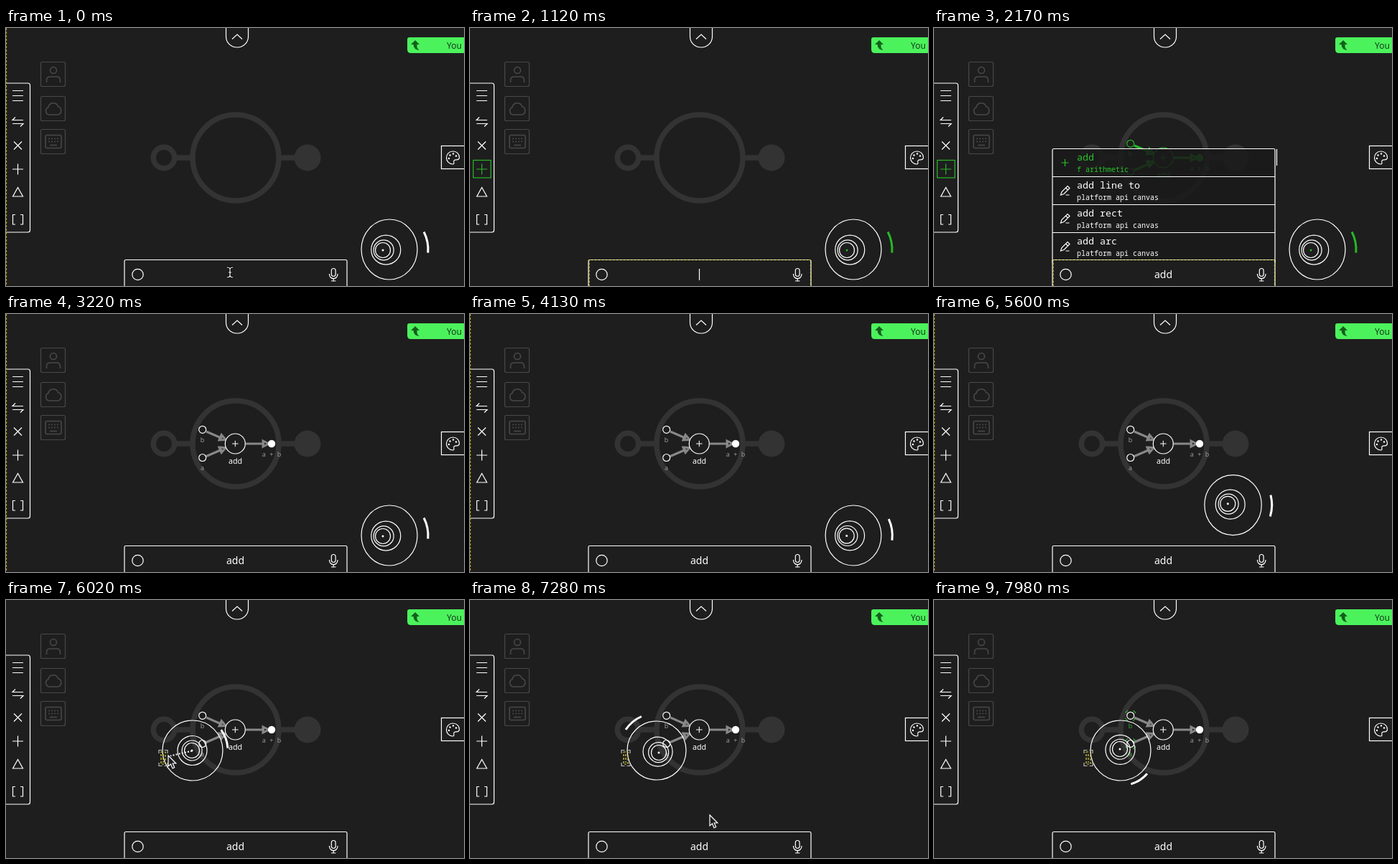
An HTML page that plays this animation: 638x360 px, repeating every 8000 ms.

```html
<!DOCTYPE html>
<html lang="en">
<meta charset="utf-8">
<title>Node editor</title>
<style>
  html, body { margin: 0; width: 100%; height: 100%; overflow: hidden; background: #1e1e1e }
  svg { display: block; width: 638px; height: 360px; fill: none; stroke: #fff; stroke-width: 1.2 }
  text { fill: #fff; stroke: none; font: 14px "Noto Sans", sans-serif }
  .mid { text-anchor: middle }
  .mono { font: 13.33px "Noto Sans Mono", monospace }
  .small { font-size: 10px }
  .faint { stroke: #484848 }
  .hint { stroke: #333; stroke-width: 7.5 }
  .label { fill: #999; font-size: 9px; word-spacing: 3px }
  .edges { stroke: #888; stroke-width: 3 }
  .edges polygon { fill: #888; stroke: none }
  .focus { stroke: #d9cf4a; stroke-dasharray: 3 2 }
  .bg { fill: #1e1e1e }
  .live { stroke: #27b827 }
  .live text, .live .solid, .live .edges polygon { fill: #27b827 }
  .live .edges { stroke: #27b827 }
  #list.picked .first { stroke: #27c427 }
  #list.picked .first text { fill: #27c427 }
</style>
<svg viewBox="0 0 638 360">
  <defs>
    <path id="pen" d="M-6 6l1.5-4.5L3.5-6.500l3 3L-1.500 4.500zM1-4l3 3M1 6h5"/>
    <path id="plus" d="M-5 0H5M0-5V5"/>
    <polygon id="head" points="-7,-4 1,0 -7,4"/>
  </defs>

  <g class="hint">
    <circle cx="320" cy="181" r="60"/>
    <circle cx="220" cy="181" r="14.700"/>
    <path d="M238 181h20M382 181h22"/>
    <circle cx="420" cy="181" r="18.500" fill="#333" stroke="none"/>
  </g>

  <g class="faint">
    <rect x="48.500" y="47.500" width="34" height="34" rx="2"/>
    <rect x="48.500" y="95.500" width="34" height="34" rx="2"/>
    <rect x="48.500" y="141.500" width="34" height="34" rx="2"/>
    <g stroke-width="1.600">
      <circle cx="66" cy="59" r="4.500"/>
      <path d="M56.500 76v-3q0-5 5-5h9q5 0 5 5v3"/>
      <path d="M60 121a5.500 5.500 0 0 1-1-10.500a7 7 0 0 1 13.500-1a6 6 0 0 1 0 11.500z"/>
      <rect x="55" y="149.500" width="22" height="18" rx="2"/>
      <path d="M59 154.500h15M59 158.500h15" stroke-dasharray="2 2"/>
      <path d="M61 163.500h10"/>
    </g>
  </g>

  <path d="M306.500-1V12a15.500 15 0 0 0 31 0V-1M315 15.500l7-6.500 7 6.500"/>

  <path d="M559 16q0-3 3-3h80v22h-78q-5 0-5-5z" fill="#4cf25c" stroke="none"/>
  <path d="M570 17l-6 6h3.500q0 7 8.500 8-4-2-3.500-8h3.500z" fill="#12601c" stroke="none"/>
  <text x="614" y="28.500" style="font-size:12px;fill:#173d1b">You</text>

  <rect x="606.500" y="164.500" width="40" height="32"/>
  <path d="M622.500 172a9 9 0 1 0 0 18c3 0 0-4 2-5.500s7 1 7-4c0-5-4-8.500-9-8.500z"/>
  <g fill="#fff" stroke="none">
    <circle cx="617" cy="182" r="1.200"/><circle cx="618.500" cy="177.500" r="1.200"/>
    <circle cx="623" cy="175.500" r="1.200"/><circle cx="627" cy="178.500" r="1.200"/>
  </g>

  <rect x="-4" y="77" width="37.500" height="208" rx="3"/>
  <path d="M9 87.500h15M9 94.500h15M9 101.500h15M24 128.500H9l4-4M9 133.500h15l-4 4M11 158.500l11 11M22 158.500l-11 11M16.500 222.500l7 12.500h-14zM13 260.500H9.500v13.500H13M20 260.500h3.500v13.500H20"/>
  <g id="addTool"><path d="M9 197h15M16.500 189.500v15"/><rect id="addFrame" x="4.500" y="184.500" width="24.500" height="24.500"/></g>

  <g id="graph">
    <g class="edges">
      <path d="M279 164l22 9.500M279 198.500l22-9.500M334 181h26"/>
      <use href="#head" transform="translate(305 175) rotate(23)"/>
      <use href="#head" transform="translate(305 187) rotate(-23)"/>
      <use href="#head" transform="translate(365 181)"/>
    </g>
    <circle class="bg" cx="319.300" cy="181" r="14"/>
    <use href="#plus" transform="translate(319.300 181) scale(.85)"/>
    <circle class="bg" cx="273.700" cy="161.300" r="5"/>
    <circle class="bg" cx="273.700" cy="200.500" r="5"/>
    <circle class="solid" cx="370" cy="181" r="5.200" fill="#fff" stroke="none"/>
    <text class="mid" x="319.500" y="208.500" style="font-size:10.700px">add</text>
    <text class="mid label" x="273.500" y="178.500" id="labelB">b</text>
    <text class="mid label" x="273.500" y="217.500" id="labelA">a</text>
    <text class="mid label" x="370" y="198.500">a + b</text>
    <g id="halos" stroke="#35b535" stroke-dasharray="5 7.570" stroke-dashoffset="-3.800">
      <circle cx="273.700" cy="161.300" r="8"/><circle cx="273.700" cy="200.500" r="8"/>
    </g>
  </g>

  <g id="list">
    <rect x="165" y="168.500" width="310" height="160" rx="2" fill="#1a1a1a" fill-opacity=".86"/>
    <path d="M165 207.500h310M165 246.500h310M165 285.500h310M477.500 169v23"/>
    <g id="rows"></g>
  </g>

  <rect class="bg" x="165" y="323.500" width="310" height="40" rx="2"/>
  <rect id="barFocus" class="focus" x="166" y="323.500" width="308.500" height="40"/>
  <circle cx="183.500" cy="344" r="7.700"/>
  <rect x="453.300" y="335.500" width="5.800" height="11" rx="2.900"/>
  <path d="M450.500 343v1a5.700 5.700 0 0 0 11.400 0v-1M456.200 350v3M453 353h6.500"/>
  <text id="query" class="mid" x="319.500" y="349">add</text>
  <path id="caret" d="M0 336v16"/>
  <g id="beam"><path d="M308 334q4 0 4 3v8q0 3 4 3M316 334q-4 0-4 3v8q0 3-4 3M310 341h4" stroke="#000" stroke-width="3"/><path d="M308 334q4 0 4 3v8q0 3 4 3M316 334q-4 0-4 3v8q0 3-4 3M310 341h4"/></g>

  <path id="edgeFocus" d="M.5 0V360" stroke="#c49a10" stroke-dasharray="3 2"/>

  <g id="eye">
    <ellipse id="globe"/>
    <circle class="iris" r="20.500"/><circle class="iris" r="14"/><circle class="iris" r="10.500"/>
    <circle id="dot" r="1.500" stroke="none"/>
    <path id="lid" stroke-width="3"/>
  </g>
  <g id="chip">
    <path stroke="#bbb" d="M.5 5V.5H5M8 .5h4.500V5M.5 18v4.500H5M8 22.500h4.500V18"/>
    <rect class="focus" x="3.500" y="3" width="6" height="17" stroke="#d9b23a"/>
    <path class="focus" d="M6.500 6v12" stroke="#d9b23a"/>
  </g>
  <path id="tether" d="M259 210.500L229 217.500" stroke-width="2" stroke-dasharray="2 2.200"/>
  <path id="pointer" class="bg" d="M0 0V15l3.500-3 2.500 6 2.700-1.200L6.200 11h4.600z"/>
</svg>
<script>
const $ = id => document.getElementById(id);
const irises = [...document.querySelectorAll('.iris')];
const PULL = [.53, .88, 1];

$('rows').innerHTML = [['add', 'f arithmetic'], ...['add line to', 'add rect', 'add arc'].map(s => [s, 'platform api canvas'])]
  .map(([title, note], i) => `<g class="${i ? '' : 'first'}" transform="translate(0 ${168 + 39 * i})">
    <use href="#${i ? 'pen' : 'plus'}" x="182.500" y="20"/>
    <text class="mono" x="199" y="17">${title}</text>
    <text class="mono small" x="199" y="33">${note}</text></g>`).join('');

// time, centre x y, radius x y, gaze x y, lid distance, lid angle, chip x
const poses = [
  [4060, 534, 309, 39, 42, -9, 1, 54, -11, 213],
  [4900, 534, 309, 38, 42, -12.5, -4, 58, 14.5, 213],
  [5110, 534, 309, 38, 42, -12, -3, 58, 17, 213],
  [5390, 534, 309, 38, 42, -12, -3, 58, 17, 213],
  [5880, 260, 210, 42, 42, -1, 0, 49, -20, 213],
  [6230, 260, 210, 42, 42, -1, 0, 49, -20, 213],
  [6650, 260, 210, 41, 41, 2, 2, 51, -109, 211],
  [6790, 260, 210, 41, 41, 3, 3, 52, -126, 211],
  [7070, 260, 210, 41, 41, 3, 3, 52, -130, 211],
  [7420, 260, 210, 41, 41, 3, 3, 52, -130, 211],
  [7700, 260, 210, 42, 42, 0, -1, 49, 0, 210],
  [7840, 260, 210, 42, 42, 0, -1, 49, 0, 210],
  [7980, 260, 210, 42, 42, -1, -2, 49, 57, 209]
];

function poseAt(t) {
  const i = poses.findIndex(p => p[0] >= t);
  if (i < 1) return poses[i < 0 ? poses.length - 1 : 0];
  const a = poses[i - 1], b = poses[i], k = (t - a[0]) / (b[0] - a[0]);
  return a.map((v, n) => v + (b[n] - v) * k);
}

function set(el, attrs) { for (const k in attrs) el.setAttribute(k, attrs[k]); }
function show(id, on) { $(id).style.display = on ? '' : 'none'; }

function drawEye(t, green) {
  const [, cx, cy, rx, ry, gx, gy, r, angle, chipX] = poseAt(t);
  const ink = green ? '#27b827' : '#fff';
  set($('globe'), { cx, cy, rx, ry });
  irises.forEach((el, i) => set(el, { cx: cx + gx * PULL[i], cy: cy + gy * PULL[i] }));
  set($('dot'), { cx: cx + gx, cy: cy + gy, fill: ink });
  const at = d => {
    const a = (angle + d) * Math.PI / 180;
    return `${cx + r * Math.cos(a)} ${cy + r * Math.sin(a)}`;
  };
  set($('lid'), { d: `M${at(-16)}A${r} ${r} 0 0 1 ${at(16)}`, stroke: ink });
  set($('chip'), { transform: `translate(${chipX - .5} 209)` });
}

function draw(ms) {
  const t = Math.floor(ms / 70) * 70;
  const within = (a, b) => t >= a && t < b;
  const searching = within(210, 3150), typed = t >= 1260;

  show('beam', t < 210);
  show('edgeFocus', t < 210 || within(3150, 6020));
  show('barFocus', searching);
  show('addFrame', searching);
  $('addTool').setAttribute('class', searching ? 'live' : '');
  show('query', typed);
  show('caret', within(210, 630) || within(1120, 2170) || within(2660, 3150));
  set($('caret'), { transform: `translate(${typed ? 333.5 : 319.5} 0)` });

  show('list', within(1470, 3150));
  const rise = Math.min(1, (t - 1400) / 490);
  set($('list'), { transform: `translate(0 ${155 * (1 - rise) ** 2})`, class: t >= 2100 ? 'picked' : '' });

  show('graph', t >= 1890);
  $('graph').setAttribute('class', searching ? 'live' : '');
  const ready = t >= 7910;
  show('halos', ready);
  for (const id of ['labelA', 'labelB']) $(id).style.fill = ready ? '#35a535' : '';

  drawEye(t, searching);
  show('chip', t >= 6020);
  show('tether', within(6020, 6160));
  show('pointer', within(6020, 6160) || within(7280, 7490));
  set($('pointer'), { transform: t < 7000 ? 'translate(226 217)' : 'translate(334 300)' });
}

const start = performance.now();
(function tick() {
  draw((performance.now() - start) % 8000);
  requestAnimationFrame(tick);
})();
</script>
</html>
```
